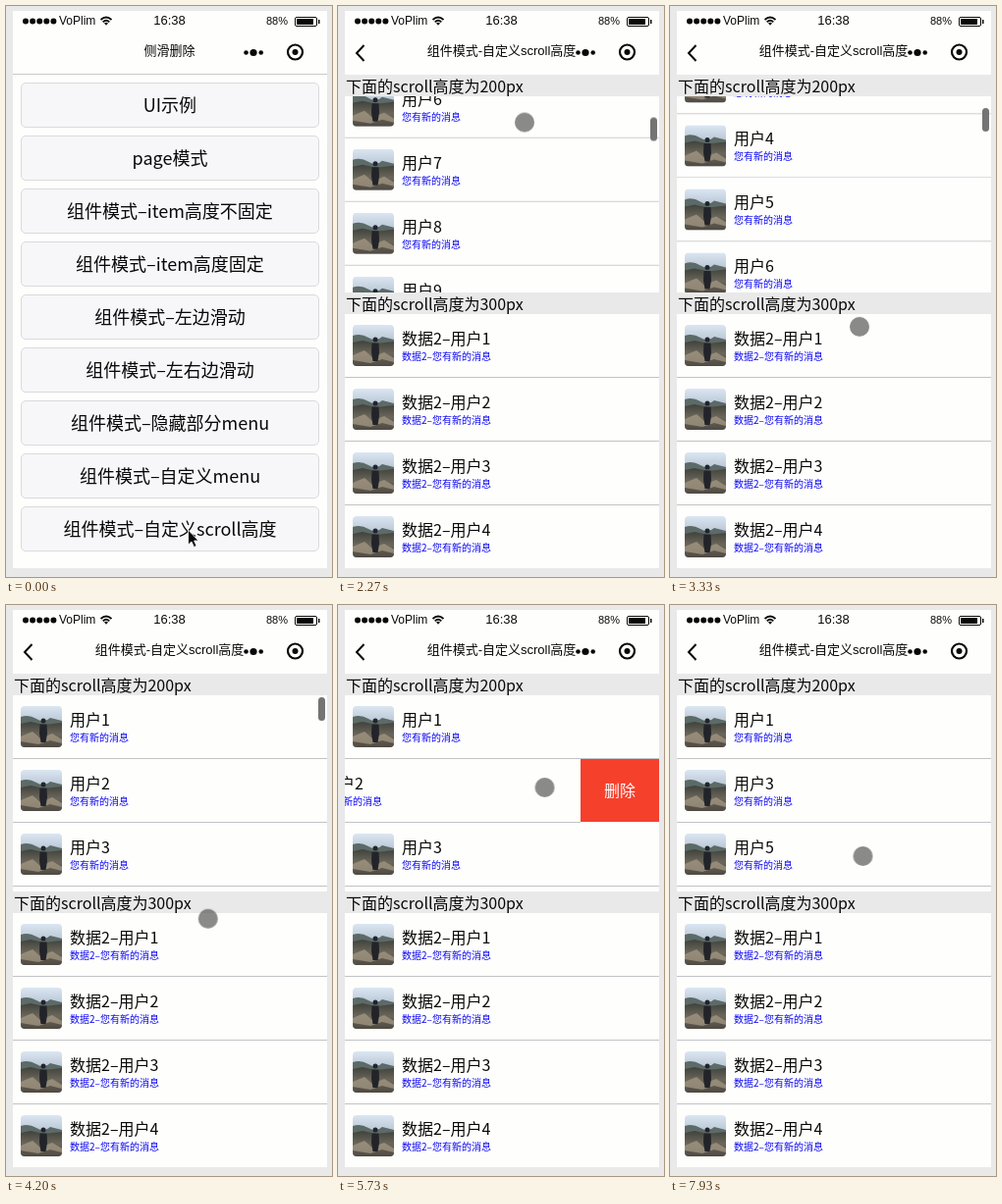
Recreate the animation shown at these times as an HTML page. Size 332 px wide and 582 px high, loop 8000 ms.

```html
<!DOCTYPE html>
<html lang="zh-CN">
<head>
<meta charset="utf-8">
<title>侧滑删除</title>
<style>
  @property --scroll { syntax: "<number>"; inherits: true; initial-value: 0; }

  :root {
    --t: 0;
    --gray: #e9e9ea;
    --paper: #fefefd;
    --line: #c3c3c6;
  }
  * { box-sizing: border-box; margin: 0; padding: 0; }
  html, body { width: 100%; height: 100%; overflow: hidden; background: var(--gray); }
  body { font-family: "Noto Sans CJK SC", "Noto Sans CJK", sans-serif; color: #080808; }

  /* Every animation is paused and positioned by the clock through --t. */
  .anim {
    animation: 8s linear calc(var(--t) * -1ms) infinite paused;
  }

  #stage { position: relative; width: 332px; height: 582px; overflow: hidden; }
  #screen {
    position: absolute; left: 7px; top: 5px; width: 320px; height: 568px;
    overflow: hidden; background: var(--paper);
  }
  .page { position: absolute; inset: 0; background: var(--paper); }
  .title {
    position: absolute; top: 31px; width: 319px; text-align: center;
    font: 13px/20px "Liberation Sans", "Noto Sans CJK SC", "Noto Sans CJK", sans-serif;
  }

  #home::before {
    content: ""; position: absolute; top: 64px; width: 100%; height: 1px; background: #cacaca;
  }
  .button {
    position: absolute; left: 8px; width: 304px; height: 46px;
    border: 1px solid #dadadc; border-radius: 5px; background: #f7f7f9;
    font-size: 18px; line-height: 43px; text-align: center;
  }

  #detail { animation-name: enter; }
  #back { position: absolute; left: 10px; top: 33px; }
  .heading {
    position: absolute; width: 320px; height: 22px; padding-left: 1px;
    background: var(--gray); font-size: 16px; line-height: 22px;
  }
  .list { position: absolute; width: 320px; overflow: hidden; list-style: none; }
  #first { top: 87px; height: 200px; animation-name: scroll; }
  #second { top: 309px; height: 259px; }
  #rows { list-style: none; transform: translateY(calc(var(--scroll) * -1px)); }
  #thumb {
    position: absolute; right: 2px; top: 2px; width: 7px; height: 24px; border-radius: 3.5px;
    background: #747474; translate: 0 calc(var(--scroll) * .0563px);
    animation-name: thumb;
  }

  .row { height: 65px; overflow: hidden; }
  .slide { position: relative; height: 65px; border-bottom: 1px solid var(--line); }
  .slide svg { position: absolute; left: 8px; top: 11px; width: 42px; height: 42px; border-radius: 4px; }
  .name { position: absolute; left: 58px; top: 14px; font-size: 16px; line-height: 20px; }
  .note { position: absolute; left: 58px; top: 36px; font-size: 10px; line-height: 14px; color: #0a05f5; }
  .delete {
    position: absolute; left: 100%; top: 0; width: 80px; height: 64px;
    background: #f5402c; color: #fff; font-size: 16px; line-height: 62px; text-align: center;
  }
  .drop2 { animation-name: drop2; animation-timing-function: step-end; }
  .drop4 { animation-name: drop4; animation-timing-function: step-end; }
  .drop2 .slide { animation-name: swipe2; }
  .drop4 .slide { animation-name: swipe4; }

  #chrome { position: absolute; inset: 0; }
  #chrome text { font-family: "Liberation Sans", Arial, sans-serif; }
  #arrow { animation-name: arrow; animation-timing-function: step-end; }
  #touch {
    position: absolute; left: -10px; top: -10px; width: 20px; height: 20px; border-radius: 50%;
    background: #4c4c4ca6; animation-name: touch, touch-on; animation-timing-function: linear, step-end;
  }

  @keyframes enter {
    0%, 4.6% { transform: translateX(100%); animation-timing-function: ease-out; }
    9%, 100% { transform: none; }
  }
  @keyframes scroll {
    0%, 23.75% { --scroll: 0; animation-timing-function: ease-in; }
    27.5% { --scroll: 140; animation-timing-function: cubic-bezier(.15, .6, .4, 1); }
    35%, 35.9% { --scroll: 728; animation-timing-function: ease-in; }
    41.67% { --scroll: 176; animation-timing-function: ease-out; }
    45.5%, 100% { --scroll: 0; }
  }
  @keyframes thumb {
    0%, 23.7% { opacity: 0; }
    24.2%, 61.5% { opacity: 1; }
    65%, 100% { opacity: 0; }
  }
  @keyframes swipe2 {
    0%, 66.7% { transform: none; }
    70.6%, 100% { transform: translateX(-80px); }
  }
  @keyframes swipe4 {
    0%, 87.5% { transform: none; }
    90.9%, 100% { transform: translateX(-80px); }
  }
  @keyframes drop2 { 0% { height: 65px; } 78%, 100% { height: 0; } }
  @keyframes drop4 { 0% { height: 65px; } 96%, 100% { height: 0; } }
  @keyframes arrow { 0% { opacity: 1; } .8%, 100% { opacity: 0; } }
  @keyframes touch-on { 0% { opacity: 0; } .8%, 100% { opacity: 1; } }
  @keyframes touch {
    0%, 11.7% { translate: 195px 534px; animation-timing-function: ease-in-out; }
    21.6% { translate: 196px 262px; }
    23.75% { translate: 196px 258px; }
    27.5% { translate: 190px 118px; }
    35.9% { translate: 190px 124px; }
    41.67% { translate: 193px 327px; }
    50% { translate: 200px 330px; }
    60% { translate: 223px 289px; }
    66.7% { translate: 262px 186px; }
    70.6% { translate: 188px 186px; }
    75.9%, 78.7% { translate: 300px 186px; }
    85% { translate: 269px 244px; }
    87.5% { translate: 262px 246px; }
    90.9% { translate: 190px 247px; }
    95%, 96.3% { translate: 297px 247px; }
    99.1% { translate: 197px 256px; }
    100% { translate: 190px 256px; }
  }
</style>
</head>
<body>
<svg width="0" height="0" style="position:absolute">
  <defs>
    <linearGradient id="sky" x2="0" y2="1">
      <stop stop-color="#dbe6f2"/><stop offset=".5" stop-color="#aebccb"/>
    </linearGradient>
    <linearGradient id="ground" x2="0" y2="1">
      <stop stop-color="#3f423c"/><stop offset=".5" stop-color="#6b665a"/><stop offset="1" stop-color="#4f4a42"/>
    </linearGradient>
    <symbol id="photo" viewBox="0 0 42 42">
      <rect width="42" height="42" fill="url(#sky)"/>
      <path d="M0 11Q8 8 16 13T30 12L42 15V30H0Z" fill="#5c6a68"/>
      <path d="M0 18L10 16L24 19L42 17V42H0Z" fill="url(#ground)"/>
      <path d="M0 31L12 26L20 33L32 28L42 34V38L30 35L18 39L0 36Z" fill="#a89c87" opacity=".7"/>
      <circle cx="23" cy="15" r="2.500" fill="#22242a"/>
      <path d="M19.500 18.500H26.500L27 28L25.500 37H20.500L19 28Z" fill="#22242a"/>
    </symbol>
  </defs>
</svg>

<div id="stage">
  <div id="screen">
    <section class="page" id="home"><div class="title">侧滑删除</div></section>
    <section class="page anim" id="detail">
      <svg id="back" width="12" height="20" fill="none" stroke="#080808" stroke-width="2"><path d="M9.500 2L2 10L9.500 18"/></svg>
      <div class="title">组件模式-自定义scroll高度</div>
      <div class="heading" style="top:65px">下面的scroll高度为200px</div>
      <div class="list anim" id="first"><ul id="rows"></ul><i id="thumb" class="anim"></i></div>
      <div class="heading" style="top:287px">下面的scroll高度为300px</div>
      <ul class="list" id="second"></ul>
    </section>
  </div>

  <svg id="chrome" width="332" height="582" fill="#080808">
    <path d="M20 15.500H49" stroke="#080808" stroke-width="6" stroke-linecap="round" stroke-dasharray="0 7.1"/>
    <text x="54" y="19" font-size="12">VoPlim</text>
    <path d="M96.500 14Q102 9 107.500 14M98.700 16.300Q102 13.300 105.300 16.300" fill="none" stroke="#080808" stroke-width="1.800"/>
    <path d="M100 17.600Q102 16 104 17.600L102 19.800Z"/>
    <text x="166.500" y="19" font-size="13" text-anchor="middle">16:38</text>
    <text x="265" y="19" font-size="11">88%</text>
    <rect x="294.500" y="11.500" width="22" height="9" rx="1.500" fill="none" stroke="#080808"/>
    <path d="M296 13H313V19H296ZM318 14H319.500V18H318Z"/>
    <circle cx="244.500" cy="47.500" r="2.300"/>
    <circle cx="252" cy="47.500" r="3.600"/>
    <circle cx="259.700" cy="47.500" r="2.300"/>
    <circle cx="294.500" cy="47" r="7.500" fill="none" stroke="#080808" stroke-width="2.200"/>
    <circle cx="294.500" cy="47" r="3"/>
    <path id="arrow" class="anim" d="M185.500 534V549L189 546L191.500 551.500L194 550.300L191.600 545H196Z" stroke="#fefefd" stroke-width=".8"/>
  </svg>
  <div id="touch" class="anim"></div>
</div>

<script>
  const LOOP = 8000, FPS = 15, STEP = 1000 / FPS;
  const byId = id => document.getElementById(id);

  const labels = ["UI示例", "page模式",
    ...["item高度不固定", "item高度固定", "左边滑动", "左右边滑动", "隐藏部分menu", "自定义menu", "自定义scroll高度"]
      .map(name => "组件模式–" + name)];
  byId("home").insertAdjacentHTML("beforeend", labels.map((label, i) =>
    `<div class="button" style="top:${73 + 54 * i}px">${label}</div>`).join(""));

  const row = (n, prefix, removable) => {
    const anim = removable ? " anim" : "";
    return `<li class="row${removable ? ` drop${n}${anim}` : ""}"><div class="slide${anim}">
      <svg><use href="#photo"/></svg>
      <div class="name">${prefix}用户${n}</div>
      <div class="note">${prefix}您有新的消息</div>
      <div class="delete">删除</div>
    </div></li>`;
  };
  const rows = (count, prefix, removed) =>
    Array.from({ length: count }, (_, i) => row(i + 1, prefix, removed.includes(i + 1))).join("");
  byId("rows").innerHTML = rows(18, "", [2, 4]);
  byId("second").innerHTML = rows(4, "数据2–", []);

  // Time is snapped to 15 pictures per second; the small lead absorbs rounding to 10 ms.
  const start = performance.now();
  function tick() {
    const time = (performance.now() - start) % LOOP;
    const snapped = Math.floor((time + 4) / STEP) % (LOOP / STEP) * STEP;
    document.documentElement.style.setProperty("--t", snapped.toFixed(2));
    requestAnimationFrame(tick);
  }
  tick();
</script>
</body>
</html>
```
